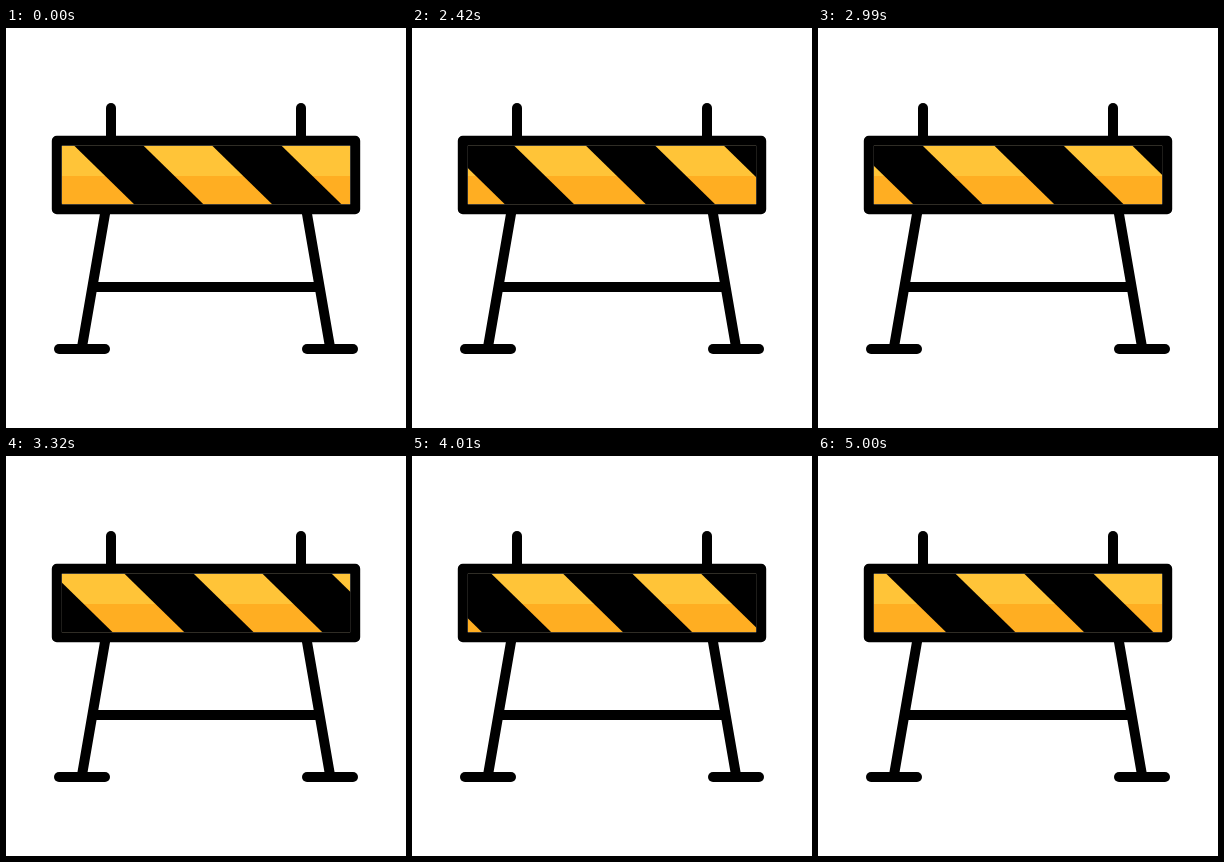
These frames come from a looping animation (400x400 px, 5030 ms). An HTML page with a canvas:

```html
<!DOCTYPE html>
<html lang="en">
<head>
<meta charset="utf-8">
<title>Road barrier</title>
<style>
  html, body { margin: 0; width: 100%; height: 100%; overflow: hidden; background: #fff; }
  canvas { display: block; width: 400px; height: 400px; }
</style>
</head>
<body>
<canvas id="stage" width="400" height="400"></canvas>
<script>
const ctx = document.getElementById('stage').getContext('2d');

const LOOP = 5030, HOLD = 2000, STEP = 30, STEPS = 100;
const PERIOD = 141, SPEED = 7.55;           // px, px per step
const EASE_FROM = 4 * PERIOD / SPEED;       // four steady cycles, then one easing out
const BANDS = [-212, -73, 68, 206];         // left edge of each black band, at the top
const BAND_W = 69.3, SLANT = 60.4;
const BOX = { l: 55.6, t: 117.5, r: 344.4, b: 176.5, mid: 148 };

// cubic-bezier(0, 0, .58, 1)
function easeOut(u) {
  let lo = 0, hi = 1;
  for (let i = 0; i < 30; i++) {
    const s = (lo + hi) / 2;
    const x = 3 * 0.58 * s * s * (1 - s) + s * s * s;
    if (x < u) lo = s; else hi = s;
  }
  return lo * lo * (3 - 2 * lo);
}

function travel(step) {
  if (step <= 0 || step >= STEPS) return 0;
  if (step < EASE_FROM) return (step * SPEED) % PERIOD;
  return PERIOD * easeOut((step - EASE_FROM) / (STEPS - EASE_FROM));
}

function line(x1, y1, x2, y2) {
  ctx.beginPath();
  ctx.moveTo(x1, y1);
  ctx.lineTo(x2, y2);
  ctx.stroke();
}

function drawPanel(shift) {
  const { l, t, r, b, mid } = BOX;
  ctx.save();
  ctx.beginPath();
  ctx.rect(l, t, r - l, b - t);
  ctx.clip();
  ctx.fillStyle = '#ffc438';
  ctx.fillRect(l, t, r - l, mid - t);
  ctx.fillStyle = '#ffae22';
  ctx.fillRect(l, mid, r - l, b - mid);
  ctx.fillStyle = '#000';
  for (const band of BANDS) {
    const x = band + shift;
    ctx.beginPath();
    ctx.moveTo(x, t);
    ctx.lineTo(x + BAND_W, t);
    ctx.lineTo(x + BAND_W + SLANT, b);
    ctx.lineTo(x + SLANT, b);
    ctx.fill();
  }
  ctx.restore();
}

function drawFrame() {
  ctx.strokeStyle = '#000';
  ctx.lineWidth = 10;
  ctx.lineCap = ctx.lineJoin = 'round';
  ctx.strokeRect(50.8, 112.7, 298.4, 68.6);
  line(88, 259, 312, 259);
  // mirrored halves: post, leg, foot
  for (const side of [x => x, x => 400 - x]) {
    line(side(105), 80, side(105), 112);
    line(side(99.5), 183, side(76), 319);
    line(side(53), 321, side(99), 321);
  }
}

function render(now) {
  const t = now % LOOP;
  const step = Math.max(0, Math.floor((t - HOLD) / STEP));
  ctx.fillStyle = '#fff';
  ctx.fillRect(0, 0, 400, 400);
  drawPanel(travel(step));
  drawFrame();
}

const start = performance.now();
function tick() {
  render(performance.now() - start);
  requestAnimationFrame(tick);
}
tick();
</script>
</body>
</html>
```
